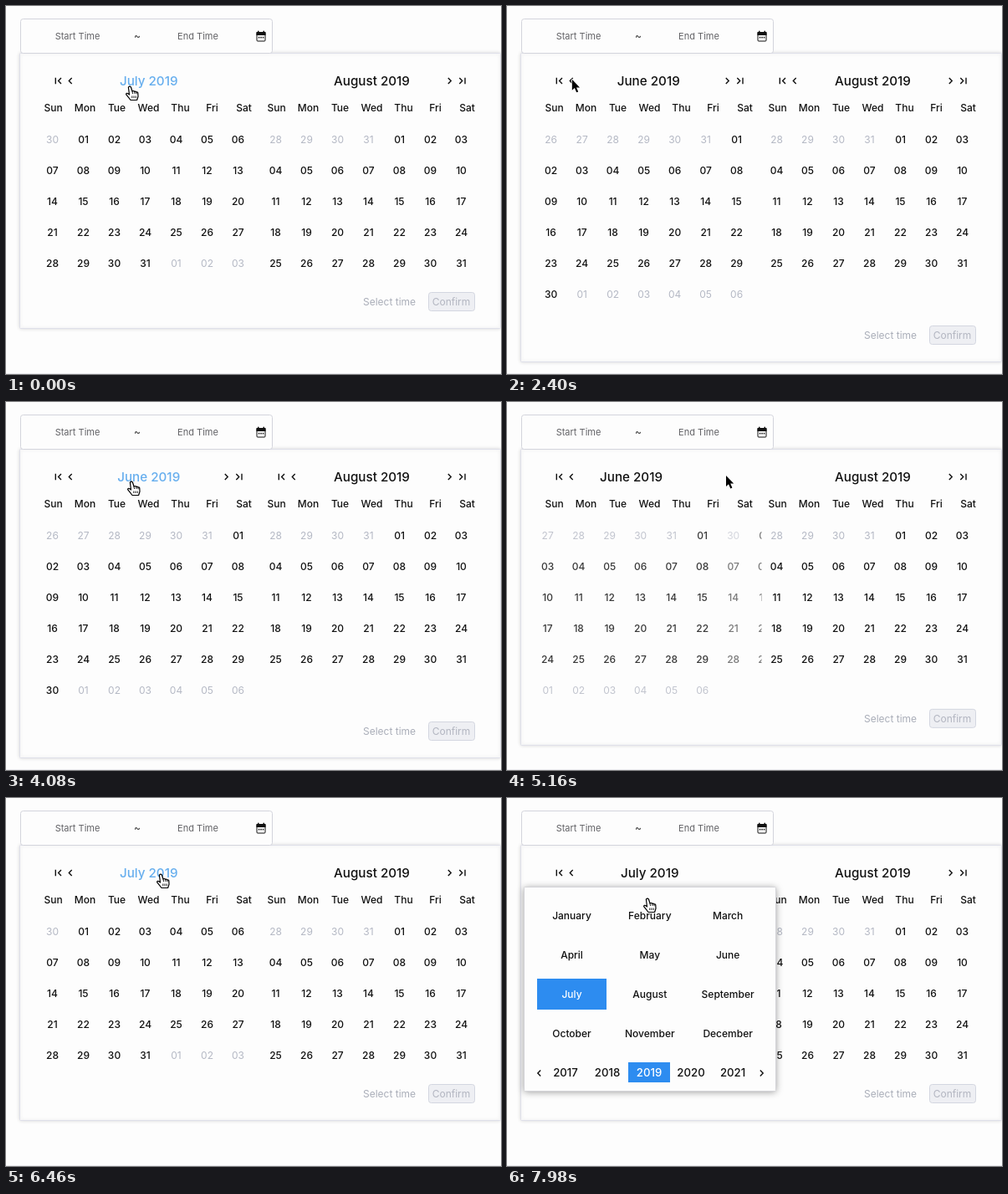
An HTML page with a canvas that plays this animation: 592x440 px, repeating every 8 s.

```html
<!DOCTYPE html>
<html lang="en">
<head>
<meta charset="utf-8">
<title>Date range picker</title>
<style>
  html, body { margin: 0; width: 100%; height: 100%; overflow: hidden; background: #fdfdfd; }
  canvas { display: block; }
</style>
</head>
<body>
<canvas id="stage" width="592" height="440"></canvas>
<script>
const ctx = document.getElementById('stage').getContext('2d');
const LOOP = 8000, PANE = 259, TITLE_SHIFT = 131, RIGHT = 267;
const PREV_CLICK = 1970, NEXT_CLICK = 5090, PICKER_OPEN = 7308;
const BG = '#fdfdfd', INK = '#111', MUTED = '#b4b8c4', BLUE = '#2d8cf0', HOVER = '#66aeee';
const LINE = '#dfe0ea';

const WEEK = ['Sun', 'Mon', 'Tue', 'Wed', 'Thu', 'Fri', 'Sat'];
const MONTHS = ['January', 'February', 'March', 'April', 'May', 'June', 'July',
  'August', 'September', 'October', 'November', 'December'];
const JUNE = { title: 'June 2019', first: 6, days: 30, before: 31, rows: 6 };
const JULY = { title: 'July 2019', first: 1, days: 31, before: 30, rows: 5 };
const AUGUST = { title: 'August 2019', first: 4, days: 31, before: 31, rows: 5 };

// Pointer tip: time, x, y
const POINTER = [
  [0, 148, 96], [300, 148, 96], [800, 104, 96], [1400, 73, 87], [2300, 73, 87],
  [2820, 122, 95], [3300, 150, 95], [4200, 150, 95], [4800, 262, 88], [5750, 262, 88],
  [6460, 185, 91], [7300, 183, 92], [7600, 183, 92], [7980, 168, 120], [8000, 168, 120]
];

const clamp = v => Math.max(0, Math.min(1, v));

// CSS "ease": cubic-bezier(.25, .1, .25, 1)
function ease(t) {
  t = clamp(t);
  let lo = 0, hi = 1;
  for (let i = 0; i < 20; i++) {
    const s = (lo + hi) / 2;
    const x = .75 * s * (1 - s) + s ** 3;
    if (x < t) lo = s; else hi = s;
  }
  return .3 * lo * (1 - lo) ** 2 + 3 * lo * lo * (1 - lo) + lo ** 3;
}

function pointerAt(t) {
  const i = POINTER.findIndex(p => p[0] > t);
  const [t0, x0, y0] = POINTER[i - 1], [t1, x1, y1] = POINTER[i];
  const u = (t - t0) / (t1 - t0), k = u * u * (3 - 2 * u);
  return { x: x0 + (x1 - x0) * k, y: y0 + (y1 - y0) * k };
}

function text(str, x, y, size = 12, color = INK, weight = 500) {
  ctx.font = `${weight} ${size}px Inter, sans-serif`;
  ctx.textAlign = 'center';
  ctx.fillStyle = color;
  ctx.fillText(str, x, y + size * .365);
}

function box(x, y, w, h, r, fill, stroke) {
  ctx.beginPath();
  ctx.roundRect(x, y, w, h, r);
  if (fill) { ctx.fillStyle = fill; ctx.fill(); }
  if (stroke) { ctx.strokeStyle = stroke; ctx.lineWidth = 1; ctx.stroke(); }
}

function clipped(x, y, w, h, draw) {
  ctx.save();
  ctx.beginPath();
  ctx.rect(x, y, w, h);
  ctx.clip();
  draw();
  ctx.restore();
}

// dir -1 points left, 1 points right; a bar marks the year step
function chevron(x, y, dir, bar) {
  ctx.beginPath();
  ctx.moveTo(x - dir * 1.7, y - 3.5);
  ctx.lineTo(x + dir * 1.7, y);
  ctx.lineTo(x - dir * 1.7, y + 3.5);
  if (bar) {
    ctx.moveTo(x + dir * 5, y - 3.8);
    ctx.lineTo(x + dir * 5, y + 3.8);
  }
  ctx.strokeStyle = INK;
  ctx.lineWidth = 1.4;
  ctx.stroke();
}

function backArrows(x) { chevron(x + 64.3, 89.5, -1, true); chevron(x + 77, 89.5, -1); }
function nextArrows(x) { chevron(x + 263.5, 89.5, 1); chevron(x + 277, 89.5, 1, true); }

function dayGrid(month, x, alpha = 1) {
  ctx.globalAlpha = alpha;
  for (let i = 0; i < month.rows * 7; i++) {
    const n = i - month.first + 1;
    const inside = n > 0 && n <= month.days;
    const day = n < 1 ? n + month.before : inside ? n : n - month.days;
    text(String(day).padStart(2, '0'), x + 55.5 + i % 7 * 37, 160 + Math.floor(i / 7) * 37,
      12, inside ? INK : MUTED, inside ? 500 : 400);
  }
  ctx.globalAlpha = 1;
}

function dateInput() {
  box(17.5, 15.5, 301, 41, 3, BG, '#d3d4dc');
  text('Start Time', 85.5, 36, 11, '#626266', 400);
  text('~', 157, 36, 12, '#444');
  text('End Time', 229.5, 36, 11, '#626266', 400);
  box(300, 31.5, 10, 10.5, 1, null, INK);
  ctx.fillStyle = INK;
  ctx.fillRect(299.5, 31, 11, 4);
  ctx.fillRect(301, 29.7, 1.5, 2);
  ctx.fillRect(307.5, 29.7, 1.5, 2);
  for (let i = 0; i < 3; i++) ctx.fillRect(301.8 + i * 2.5, 36.8, 1.5, 1.6);
}

function footer(extra) {
  text('Select time', 458.5, 354 + extra, 12, '#a9adb8', 400);
  box(505.5, 342.5 + extra, 55, 22, 3, '#eeeff3', '#d3d6e0');
  text('Confirm', 532.5, 354 + extra, 12, '#b2b5c0', 400);
}

function leftMonth(from, to, dir, elapsed, hovered) {
  const p = ease(elapsed / 500);
  const color = hovered ? HOVER : INK;
  clipped(105, 76, 132, 28, () => {
    text(from.title, 170.7 + dir * p * TITLE_SHIFT, 89.5, 15.2, color);
    text(to.title, 170.7 + dir * (p - 1) * TITLE_SHIFT, 89.5, 15.2, color);
  });
  clipped(37, 140, 267.5, 225, () => {
    if (p < 1) dayGrid(from, dir * p * PANE, 1 - p);
    dayGrid(to, dir * (p - 1) * PANE, ease(elapsed / 300) ** .6);
  });
}

function monthPicker(elapsed) {
  const scale = 1 - (1 - clamp(elapsed / 300)) ** 5;
  ctx.save();
  ctx.globalAlpha = clamp(scale * 1.2);
  ctx.translate(0, 106);
  ctx.scale(1, scale);
  ctx.translate(0, -106);
  ctx.save();
  ctx.shadowColor = 'rgba(0, 0, 0, .4)';
  ctx.shadowBlur = 8;
  ctx.shadowOffsetY = 1;
  box(20.5, 106.5, 301, 244, 1, BG);
  ctx.restore();
  box(20.5, 106.5, 301, 244, 1, null, '#d4d4d8');
  box(36, 216, 83, 37, 0, BLUE);
  MONTHS.forEach((name, i) =>
    text(name, 77.5 + i % 3 * 93.3, 141 + Math.floor(i / 3) * 47, 12, i === 6 ? '#fff' : INK));
  box(145, 316, 50, 24, 0, BLUE);
  for (let i = 0; i < 5; i++)
    text(String(2017 + i), 70 + i * 50, 328, 13.2, i === 2 ? '#fff' : INK);
  chevron(38.5, 329, -1);
  chevron(304.5, 329, 1);
  ctx.restore();
}

const ARROW = new Path2D('M0 0V13L3 10.2L5.3 15.5L7.4 14.6L5.2 9.6H9.2Z');
const HAND = new Path2D('M-1.6 1.2Q0-.8 1.5 1.2L3 6Q4.6 4.8 5.6 6.4Q7 5.6 7.9 7Q9.5 6.6 9.8 8.2' +
  'L10 12L8.6 16.5H1L-1.6 13.2L-4.4 9.6Q-4 7.6-2 8.8L-.5 10Z');
const FINGERS = new Path2D('M3 6L3.6 9M5.6 6.4L6 9M7.9 7L8.1 9.3M2.8 11.5V14M5 11.5V14M7.2 11.5V14');

function cursor({ x, y }, hand) {
  ctx.save();
  ctx.translate(x, y);
  ctx.lineJoin = 'round';
  ctx.lineWidth = 1.2;
  ctx.fillStyle = hand ? '#fff' : '#000';
  ctx.strokeStyle = hand ? '#000' : '#fff';
  if (hand) {
    ctx.fill(HAND);
    ctx.stroke(HAND);
    ctx.lineWidth = .9;
    ctx.stroke(FINGERS);
  } else {
    ctx.stroke(ARROW);
    ctx.fill(ARROW);
  }
  ctx.restore();
}

function draw(t) {
  const pointer = pointerAt(t);
  const onTitleRow = pointer.y > 78 && pointer.y < 101;
  const hovered = onTitleRow && pointer.x > 130 && pointer.x < 211;
  const pickerOpen = t >= PICKER_OPEN;
  const hand = pickerOpen || onTitleRow && pointer.x > 105 && pointer.x < 237;
  const showsJune = t >= PREV_CLICK && t < NEXT_CLICK;
  const extra = 40 * (ease((t - PREV_CLICK) / 300) - ease((t - NEXT_CLICK) / 300));

  ctx.fillStyle = BG;
  ctx.fillRect(0, 0, 592, 440);
  ctx.fillStyle = '#ededf0';
  ctx.fillRect(0, 439, 592, 1);

  ctx.save();
  ctx.shadowColor = 'rgba(0, 0, 0, .14)';
  ctx.shadowBlur = 4;
  box(16.5, 56.5, 575, 329 + extra, 1, BG, LINE);
  ctx.restore();
  dateInput();

  backArrows(0);
  nextArrows(RIGHT);
  if (showsJune) {
    nextArrows(0);
    backArrows(RIGHT);
  }
  WEEK.forEach((name, i) => {
    text(name, 56.5 + i * 38, 122);
    text(name, 56.5 + RIGHT + i * 38, 122);
  });
  text(AUGUST.title, 437.5, 89.5, 15.2);
  dayGrid(AUGUST, RIGHT);
  if (showsJune) leftMonth(JULY, JUNE, 1, t - PREV_CLICK, hovered);
  else leftMonth(JUNE, JULY, -1, t < PREV_CLICK ? 500 : t - NEXT_CLICK, hovered);
  footer(extra);

  if (pickerOpen) monthPicker(t - PICKER_OPEN);
  cursor(pointer, hand);
}

function frame() {
  draw(performance.now() % LOOP);
  requestAnimationFrame(frame);
}
frame();
</script>
</body>
</html>
```
